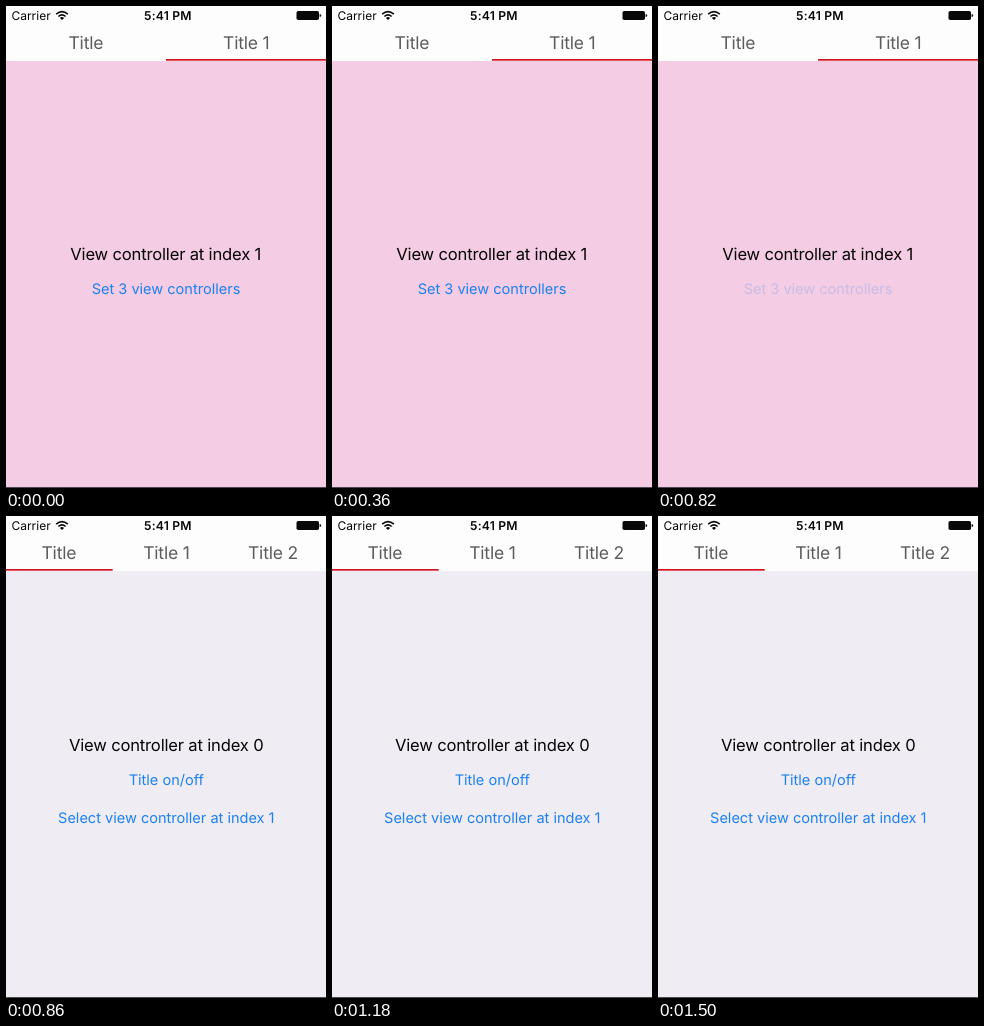
An HTML page that plays this animation: 320x482 px, repeating every 1.55 s.

```html
<!DOCTYPE html>
<html lang="en">
<head>
<meta charset="utf-8">
<title>Tabbed pager</title>
<style>
  html, body { margin: 0; width: 100%; height: 100%; overflow: hidden; background: #fefdfe; }
  svg { display: block; width: 100vw; height: 100vh; }
  text { font-family: Inter, Roboto, sans-serif; text-anchor: middle; text-rendering: geometricPrecision; }
  .tab { font-size: 17.5px; letter-spacing: -0.18px; fill: #5c5b5d; }
  .label { font-size: 16.6px; letter-spacing: -0.18px; fill: #050505; }
  .link { font-size: 14.55px; fill: #1c80ee; }
  .status { font-size: 12px; fill: #080808; }
  .carrier { text-anchor: start; }
  .clock { font-size: 12.2px; font-weight: 600; letter-spacing: 0.2px; }
</style>
</head>
<body>
<svg viewBox="0 0 320 482" xmlns="http://www.w3.org/2000/svg">
  <rect width="320" height="482" fill="#fefdfe"/>
  <rect id="page" y="55" width="320" height="427"/>
  <rect y="481" width="320" height="1" fill="#4f4a4f"/>

  <g id="status">
    <text class="status carrier" x="5.4" y="13.8">Carrier</text>
    <g fill="none" stroke="#080808" stroke-width="1.6">
      <path d="M50.2 8.2Q56 3 61.8 8.2"/>
      <path d="M52.4 10.5Q56 7.3 59.6 10.5"/>
    </g>
    <path d="M56 14.1L53.9 11.9Q56 10.3 58.1 11.9Z" fill="#080808"/>
    <text class="status clock" x="161.9" y="13.8">5:41 PM</text>
    <rect x="290.5" y="5" width="22.5" height="9" rx="1.8" fill="#080808"/>
    <path d="M313.6 8Q315.2 8.3 315.2 9.6T313.6 11.2Z" fill="#080808"/>
  </g>

  <g id="two">
    <text class="tab" x="79.9" y="43">Title</text>
    <text class="tab" x="240.3" y="43">Title 1</text>
    <text class="label" x="159.7" y="254.2">View controller at index 1</text>
    <text class="link" id="set" x="160" y="287.7">Set 3 view controllers</text>
  </g>

  <g id="three">
    <text class="tab" x="52.9" y="43">Title</text>
    <text class="tab" x="160.4" y="43">Title 1</text>
    <text class="tab" x="267" y="43">Title 2</text>
    <text class="label" x="160.2" y="235.2">View controller at index 0</text>
    <text class="link" x="160.3" y="268.7">Title on/off</text>
    <text class="link" x="160.3" y="306.7">Select view controller at index 1</text>
  </g>

  <rect id="bar" y="53" height="1.7" fill="#d3141f"/>
</svg>
<script>
  const LOOP = 1550, PRESS = 550, SWAP = 860;
  const $ = id => document.getElementById(id);
  const set = (id, attrs) => {
    for (const key in attrs) $(id).setAttribute(key, attrs[key]);
  };

  function draw(t) {
    const swapped = t >= SWAP;
    set("page", { fill: swapped ? "#efecf3" : "#f4cce3" });
    set("two", { visibility: swapped ? "hidden" : "visible" });
    set("three", { visibility: swapped ? "visible" : "hidden" });
    set("bar", { x: swapped ? 0 : 160, width: swapped ? 320 / 3 : 160 });
    // The pressed button dims at once and stays dim until the swap.
    $("set").style.fill = t >= PRESS ? "#c8bce6" : "#1c80ee";
  }

  const start = performance.now();
  function tick() {
    draw((performance.now() - start) % LOOP);
    requestAnimationFrame(tick);
  }
  tick();
</script>
</body>
</html>
```
